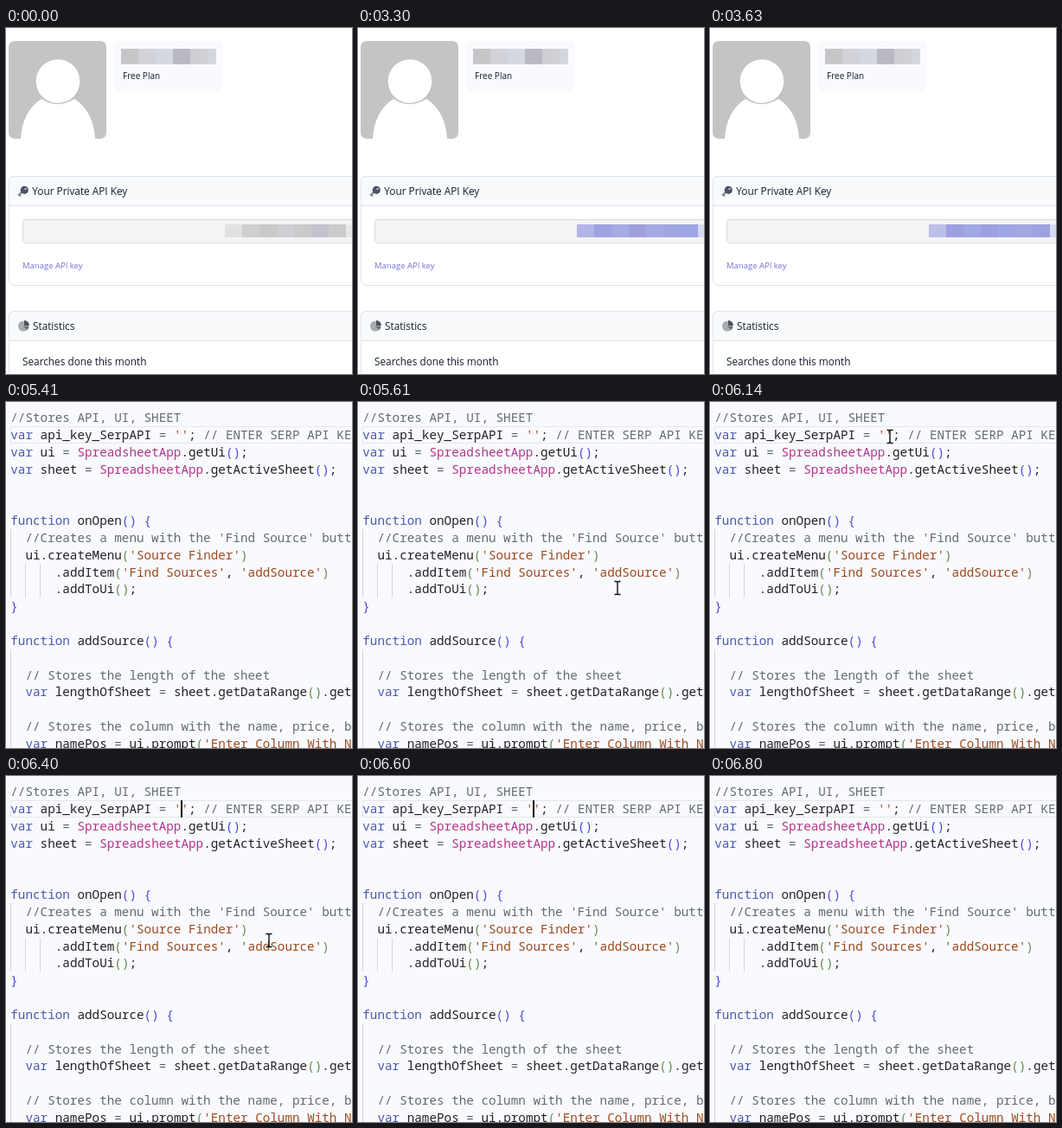
These frames come from a looping animation (400 px wide and 400 px high, 8.84 s). An HTML page:

```html
<!DOCTYPE html>
<html lang="en">
<head>
<meta charset="utf-8">
<title>API key setup</title>
<style>
  html, body { margin: 0; width: 100%; height: 100%; overflow: hidden; background: #fff; }
  svg { display: block; width: 100%; height: 100%; }
  text { white-space: pre; }
  #account text { font-family: "Open Sans", "Noto Sans", sans-serif; fill: #161c2d; }
  #account .head { font-size: 11.8px; font-weight: 500; }
  #account .link { font-size: 9.5px; fill: #7472da; }
  #account .small { font-size: 10px; }
  .card { fill: #fff; stroke: #dfe3e8; }
  .bar { fill: #f8fafc; stroke: #dfe3e8; }
  #lines text { font: 350 14.29px "Noto Sans Mono", "DejaVu Sans Mono", monospace; fill: #202124; }
  #lines .comment { fill: #666a70; }
  #lines .keyword { fill: #4a58b4; }
  #lines .string { fill: #9c4a20; }
  #lines .type { fill: #b3358a; }
  #lines .op { fill: #5f6368; }
  #lines .b0 { fill: #4f46e4; }
  #lines .b1 { fill: #5f8a50; }
  #lines .b2 { fill: #7b3814; }
</style>
</head>
<body>
<svg viewBox="0 0 400 400">
  <g id="account">
    <rect width="400" height="400" fill="#fff"/>
    <rect x="3" y="15" width="113" height="113" rx="7" fill="#c4c4c4"/>
    <path d="M17 128C18 108 26 91 41 82Q60 94 79 82C94 91 102 108 103 128Z" fill="#fff"/>
    <circle cx="60" cy="61.5" r="25.3" fill="#fff"/>

    <rect x="125" y="15" width="125" height="58" rx="6" fill="#f8fafd"/>
    <g id="nameMosaic"></g>
    <text class="small" x="135" y="59">Free Plan</text>

    <rect class="card" x="3.5" y="171.5" width="420" height="126" rx="6"/>
    <path class="bar" d="M3.5 205.5V177.5Q3.5 171.5 9.5 171.5H410V205.5Z"/>
    <path d="M19.5 188.5L14.3 193.7" stroke="#8d919c" stroke-width="2.6"/>
    <path d="M15 192.5l2 2" stroke="#6c7180" stroke-width="1.4"/>
    <circle cx="21.3" cy="187.3" r="4.6" fill="#4c5267"/>
    <circle cx="22.6" cy="186" r="1.2" fill="#b9bcc6"/>
    <text class="head" x="30.3" y="193">Your Private API Key</text>
    <rect x="19.5" y="221.5" width="400" height="27" rx="3" fill="#f3f4f6" stroke="#d8dade"/>
    <g id="keyMosaic"></g>
    <text class="link" x="19" y="278">Manage API key</text>

    <rect class="card" x="3.5" y="327.5" width="420" height="100" rx="6"/>
    <path class="bar" d="M3.5 361.5V333.5Q3.5 327.5 9.5 327.5H410V361.5Z"/>
    <circle cx="20" cy="344.8" r="6" fill="#a9abb3"/>
    <path d="M21 344V338A6 6 0 0 1 27 344Z" fill="#4c5267"/>
    <path d="M20.5 345H26.6A6 6 0 0 1 24.2 349.4Z" fill="#6a6e7d"/>
    <text class="head" x="31" y="349">Statistics</text>
    <text class="head" x="19" y="390">Searches done this month</text>
  </g>

  <g id="editor">
    <rect width="400" height="400" fill="#f8fafd"/>
    <path d="M410 28.5H5.5V47.5H410" fill="none" stroke="#e5e7eb"/>
    <path d="M5.5 147V226M22.5 187V226M39.5 187V226M5.5 286V400" stroke="#d3d5d9"/>
    <g id="lines"></g>
    <rect id="caret" x="202" y="28" width="2" height="20" fill="#111"/>
    <path id="pointer" d="M-3.5 -7.5H-1L0 -6.5L1 -7.5H3.5M-3.5 7.5H-1L0 6.5L1 7.5H3.5M0 -6.5V6.5"
          fill="none" stroke="#111" stroke-width="1.4"/>
  </g>
</svg>
<script>
const $ = id => document.getElementById(id);
const LOOP = 8840, SELECT = 3300, SETTLE = 3630, CODE = 5410, STEP = 200 / 3;

function add(parent, tag, attrs, content = '') {
  const el = document.createElementNS('http://www.w3.org/2000/svg', tag);
  for (const name in attrs) el.setAttribute(name, attrs[name]);
  el.textContent = content;
  parent.append(el);
  return el;
}

function mosaic(group, x, y, height, colors, lastWidth) {
  return colors.split(' ').map((color, i, all) => add(group, 'rect', {
    x: x + i * 20, y, height, fill: '#' + color,
    width: i === all.length - 1 ? lastWidth : 20,
    'shape-rendering': 'crispEdges'
  }));
}

mosaic($('nameMosaic'), 133, 24, 18, 'c5c6c8 d2d3d8 d6d8e1 b9bac1 cfd0d6 d4d7df', 10);

const keyColors = [
  'e0e1e2 cecfd1 c9cac9 cdcfd2 c9cbca c2c3cd cbccca e6e7e8',
  'b3b4e6 9fa3e2 a7abe2 9f9fde a5abe2 a1a6e2 9fa5e5 d6d9f0',
  'bcbfe8 9d9fdf a0a8e2 9d9fe0 9fa6e3 a5a7e2 9fa0e0 d7dbf2'
];
const keyCells = mosaic($('keyMosaic'), 253, 227, 15, keyColors[0], 7);

const code = `//Stores API, UI, SHEET
var api_key_SerpAPI = ''; // ENTER SERP API KEY
var ui = SpreadsheetApp.getUi();
var sheet = SpreadsheetApp.getActiveSheet();


function onOpen() {
  //Creates a menu with the 'Find Source' button
  ui.createMenu('Source Finder')
      .addItem('Find Sources', 'addSource')
      .addToUi();
}

function addSource() {

  // Stores the length of the sheet
  var lengthOfSheet = sheet.getDataRange().getLastRow();

  // Stores the column with the name, price, brand
  var namePos = ui.prompt('Enter Column With Name`;

let depth = 0;
function kind(token) {
  if (token.startsWith('//')) return 'comment';
  if (token[0] === "'") return 'string';
  if (/^(var|function)$/.test(token)) return 'keyword';
  if (token === 'SpreadsheetApp') return 'type';
  if (token === '=') return 'op';
  if (/[({]/.test(token)) return 'b' + depth++;
  if (/[)}]/.test(token)) return 'b' + --depth;
  return 'plain';
}

code.split('\n').forEach((line, i) => {
  const indent = line.search(/\S/);
  if (indent < 0) return;
  const text = add($('lines'), 'text', { x: 5.3 + indent * 8.574, y: 23 + i * 19.84 });
  for (const token of line.trim().match(/\/\/.*|'[^']*'?|\w+|\s+|./g))
    add(text, 'tspan', { class: kind(token) }, token);
});

// Pointer path: [step, x, y]
const path = [
  [1, 380, 392], [2, 345, 310], [3, 300, 215], [4, 258, 130], [5, 225, 66],
  [6, 210, 41], [13, 207, 40], [14, 242, 92], [15, 304, 190], [16, 350, 280],
  [17, 382, 355], [18, 404, 412]
];

function pointAt(step) {
  const i = path.findIndex(p => p[0] >= step);
  if (i < 0 || step < path[0][0]) return null;
  const b = path[i], a = path[i - 1] || b;
  const u = a === b ? 0 : (step - a[0]) / (b[0] - a[0]);
  return [a[1] + (b[1] - a[1]) * u, a[2] + (b[2] - a[2]) * u];
}

const show = (el, on) => { el.style.display = on ? '' : 'none'; };

function draw(t) {
  const inCode = t >= CODE;
  show($('account'), !inCode);
  show($('editor'), inCode);
  if (!inCode) {
    const colors = keyColors[t < SELECT ? 0 : t < SETTLE ? 1 : 2].split(' ');
    keyCells.forEach((cell, i) => cell.setAttribute('fill', '#' + colors[i]));
    return;
  }
  // Steps fall on whole hundredths of a second, up to 10 ms early
  const step = Math.floor((t - CODE + 12) / STEP);
  const point = pointAt(step);
  show($('pointer'), point);
  if (point) $('pointer').setAttribute('transform', `translate(${point.map(Math.round)})`);
  show($('caret'), t >= 6270 && t < 6800);
}

const start = performance.now();
function tick() {
  draw((performance.now() - start) % LOOP);
  requestAnimationFrame(tick);
}
tick();
</script>
</body>
</html>
```
